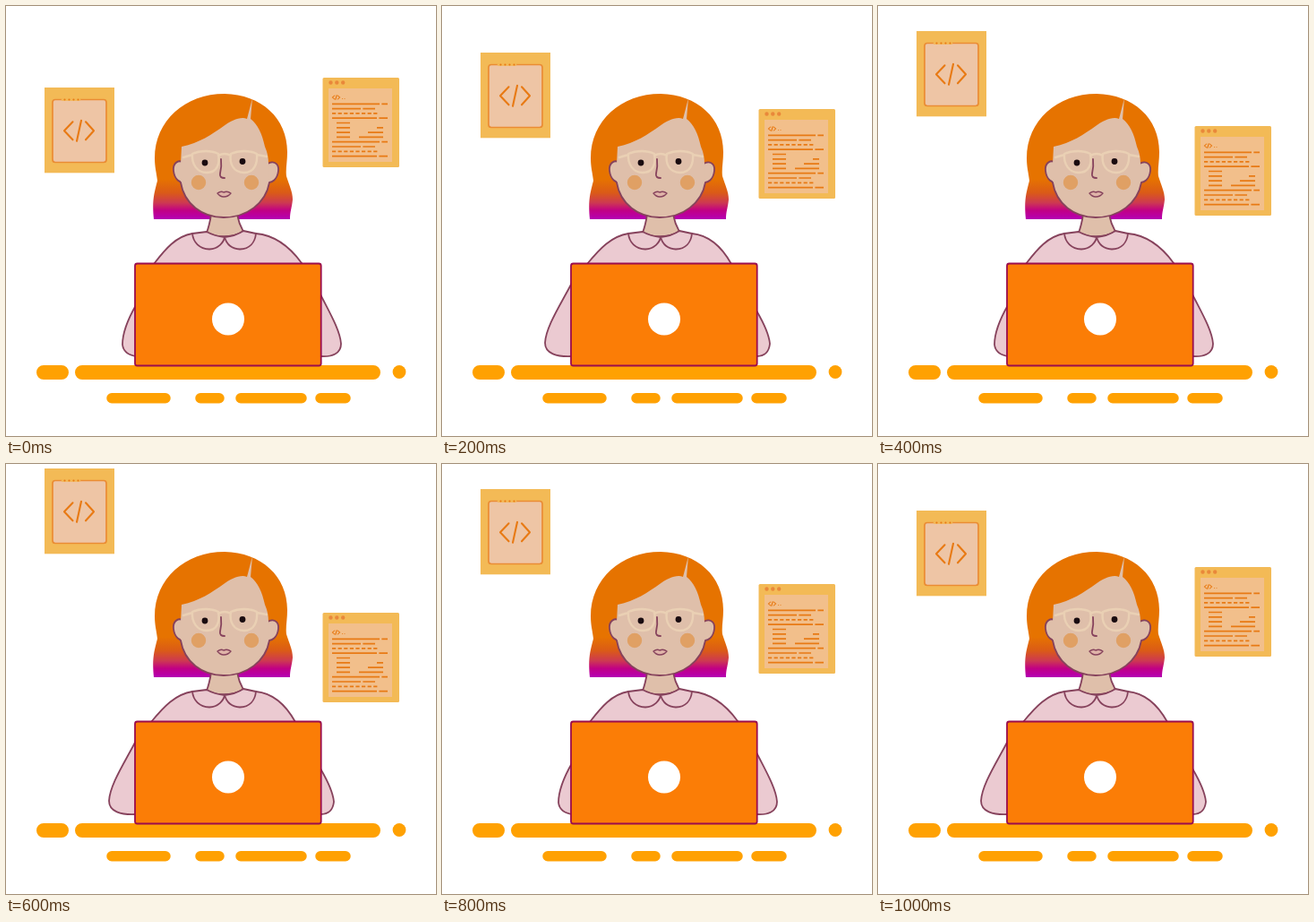
Recreate the animation shown at these times as an HTML page. Size 480x480 px, loop 1200 ms.

```html
<!DOCTYPE html>
<html lang="en">
<head>
<meta charset="utf-8">
<title>Coder at her desk</title>
<style>
  html, body { margin: 0; width: 100%; height: 100%; overflow: hidden; background: #fff; }
  svg { display: block; width: 100%; height: 100%; }
  path { fill: none; stroke-linecap: round; stroke-linejoin: round; }
  .line { stroke: #86425c; stroke-width: 1.8; }
  .shirt { fill: #ebcad1; }
  .skin { fill: #dfbfaa; }
  .code { fill: none; stroke: #e87a14; }
  .glasses { stroke: #ead0b4; stroke-width: 2.4; }
  .lips { fill: #dfb3a8; stroke-width: 1.4; }
  .desk { stroke: #ffa102; }
</style>
</head>
<body>
<svg viewBox="0 0 480 480">
  <defs>
    <linearGradient id="dye" gradientUnits="userSpaceOnUse" x1="0" y1="98" x2="0" y2="238">
      <stop offset=".68" stop-color="#e67300"/>
      <stop offset=".79" stop-color="#da5a18"/>
      <stop offset=".87" stop-color="#cd3852"/>
      <stop offset=".93" stop-color="#c10084"/>
      <stop offset="1" stop-color="#b400b4"/>
    </linearGradient>
    <path id="tag" d="M-7-10-16.500 0-7 10M2.500-11.500-2.500 11.500M7.500-10 16.500 0 7.500 10"/>
  </defs>

  <!-- wall cards, drawn from their own top edge -->
  <g id="left">
    <rect x="43" width="78" height="95.300" fill="#f3ba56"/>
    <rect x="52" y="13.500" width="60" height="70" rx="3" fill="#eec5a5" stroke="#ea8c34" stroke-width="1.700"/>
    <path d="M63 13.500h19" stroke="#f3ba56" stroke-width="2.400"/>
    <path d="M65.500 13.500h0m5 0h0m5 0h0m5 0h0" class="code" stroke-width="2.200"/>
    <use href="#tag" class="code" x="81.500" y="48.300" stroke-width="2.100"/>
  </g>
  <g id="right">
    <rect x="353.500" width="85.500" height="100" rx="1.500" fill="#f3ba56"/>
    <rect x="360" y="12" width="71" height="82" fill="#f2bf8b"/>
    <path d="M362.500 5.500h0m6.800 0h0m6.900 0h0" stroke="#e9883a" stroke-width="4.400"/>
    <use href="#tag" class="code" transform="translate(368.500 22) scale(.25 .2)" stroke-width="5"/>
    <path d="M375.500 23.500h0m2.500 0h0" class="code" stroke-width="1"/>
    <path id="rows" class="code" style="stroke-linecap:butt" stroke-width="1.700"/>
  </g>

  <path style="fill:url(#dye)" d="M165 238C163 218 165 210 169 195C168 186 166 180 166 170C166 128 200 98 244 98C285 99 314 125 314 163C314 174 312 182 313 190C316 200 320 207 320 216C319 226 317 229 317 238Z"/>

  <!-- two body poses -->
  <path id="low" class="line shirt" d="M146 391C138 390 131 387 130 378C130 364 137 348 145 334L165 288C178 271 190 257 208 254H279C301 256 317 269 330 287L351 322C360 340 373 362 374 377C374 388 364 392 351 391Z"/>
  <path id="wide" class="line shirt" d="M146 391C128 392 115 388 115 376C116 358 132 334 145 309L162 288C176 271 189 257 208 254H279C299 256 313 270 323 288L351 340C358 352 365 366 366 377C365 387 359 391 351 391Z"/>

  <!-- neck, collar -->
  <path class="line skin" d="M229 233Q227 245 224 253Q244 262 265 252Q260 243 258 233"/>
  <path class="line shirt" d="M208 254L224 252Q233 257 244 258C243 264 237 271 227 271.500C216 271 209 264 208 254Z"/>
  <path class="line shirt" d="M244 258Q256 257 265 251L279 254C278 264 272 271 261 271.500C251 271 246 265 244 258Z"/>

  <!-- head -->
  <path class="line skin" d="M200 176C193 170 186 175 187 184C188 193 194 199 201 196"/>
  <path class="line skin" d="M290 178C297 171 305 175 304 184C303 193 297 199 290 196"/>
  <path class="skin" d="M196 157C216 153 230 143 243 134C251 128 262 123 269 126L275 103L273 126C281 132 286 143 289 157Q293 166 293 176L294 196C290 220 269 236 243 236C219 236 199 221 195 196L195 176Z"/>
  <path class="line" d="M195 197C199 221 219 236 243 236C269 236 290 220 294 197"/>
  <path d="M215 197h0m59 0h0" stroke="#e0a064" stroke-width="16.400"/>
  <path class="glasses" d="M208 165C217 161 229 161 237 165C239 176 236 186 224 186C213 186 207 176 208 165ZM251 165C260 161 272 161 280 165C281 176 277 186 266 186C254 186 249 176 251 165ZM237 167Q244 163 251 167M208 166L198 169M280 166L291 168"/>
  <path d="M222 175h0M264 173.500h0" stroke="#190b10" stroke-width="6.800"/>
  <path class="line" d="M240 171Q241 179 239 187Q238 192 244 192"/>
  <path class="line lips" d="M236 209Q240 206 243 208Q247 206 251 209Q248 213 243 213Q239 213 236 209Z"/>

  <!-- desk, laptop -->
  <path class="desk" stroke-width="16" d="M42 409H62M85 409H410"/>
  <path class="desk" stroke-width="14.800" d="M439 408.500h0"/>
  <path class="desk" stroke-width="11.500" d="M118 437.700H178M217 437.700H238M262 437.700H330M351 437.700H379"/>
  <rect x="144" y="287.500" width="207.700" height="114" rx="2.500" fill="#fb7d06" stroke="#9b0d4c" stroke-width="1.800"/>
  <circle cx="248" cy="349.500" r="18" fill="#fff"/>
</svg>
<script>
  const $ = id => document.getElementById(id);

  // lines of code: word length and row width repeat every four rows, with a nested block
  const words = [53, 32, 4.2, 50], widths = [62, 48, 51, 62], gap = 2.4;
  let d = "";
  for (let row = 0; row < 12; row++) {
    const dash = (from, to) => d += `M${364 + from} ${29.3 + row * 5.3}H${364 + to}`;
    if (row > 3 && row < 8) {
      dash(5, 20);
      if (row > 4) dash(50 - (row - 5) * 10, 57);
      continue;
    }
    const word = words[row % 4], width = widths[row % 4];
    for (let x = 0; x < width; x += word + gap) dash(x, Math.min(x + word, width));
  }
  $("rows").setAttribute("d", d);

  // hold each value for an equal share of the loop
  function hold(id, values, style) {
    const frames = [...values, values[0]].map((v, i) => ({
      ...style(v), offset: i / values.length, easing: "step-end"
    }));
    $(id).animate(frames, { duration: 1200, iterations: Infinity });
  }
  const bounce = stops => [...stops, ...stops.slice(1, -1).reverse()];
  const blink = first => Array.from({ length: 6 }, (_, i) => (i + first) % 2);
  const lift = y => ({ transform: `translateY(${y}px)` });
  const show = on => ({ opacity: on });

  hold("left", bounce([91, 52, 28, 5]), lift);
  hold("right", bounce([80, 115, 134, 166]), lift);
  hold("low", blink(1), show);
  hold("wide", blink(0), show);
</script>
</body>
</html>
```
